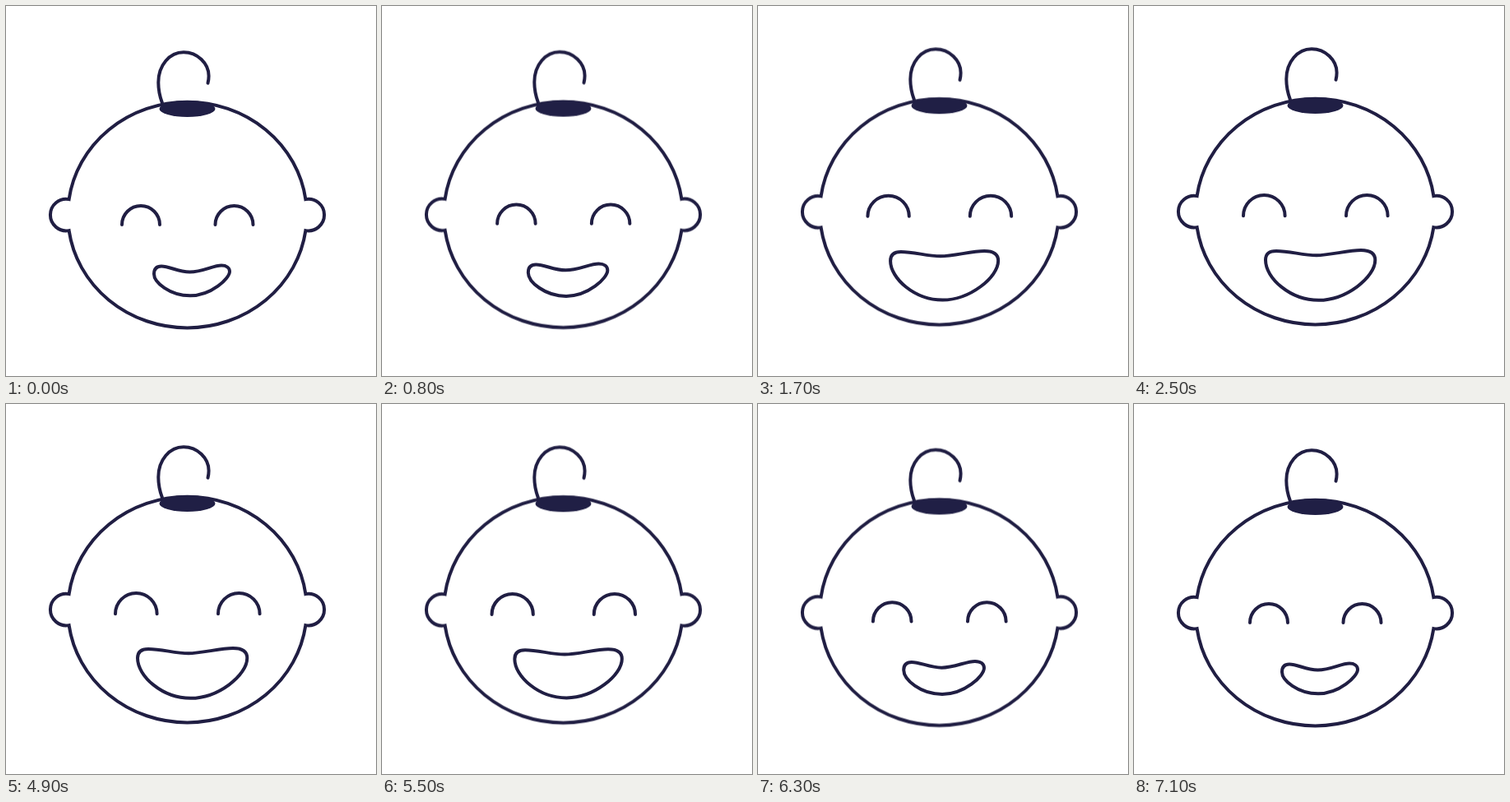
Animation, 450 px wide and 450 px high, one loop 7200 ms. Source, as an HTML page:

```html
<!DOCTYPE html>
<html lang="en">
<head>
<meta charset="utf-8">
<title>Laughing baby</title>
<style>
  html, body { margin: 0; width: 100%; height: 100%; overflow: hidden; background: #fff; }
  svg { display: block; width: 100%; height: 100%; }
  path {
    fill: none;
    stroke: #201e43;
    stroke-width: 4;
    stroke-linecap: round;
  }
  ellipse { fill: #201f45; }

  .head, .eye, .mouth {
    animation: 7200ms cubic-bezier(.82, 0, .18, 1) infinite;
  }
  .head { animation-name: lift; }
  .left { animation-name: left-eye; }
  .right { animation-name: right-eye; }
  .mouth { animation-name: laugh; stroke-linejoin: round; }

  /* smile, open laugh, hold, back to smile */
  @keyframes lift {
    0%, 100% { transform: translateY(0); }
    32.2%, 66.667% { transform: translateY(-4px); }
  }
  @keyframes left-eye {
    0%, 100% { d: path("M141 266A23 23 0 0 1 187 266"); }
    32.2%, 66.667% { d: path("M133 255.3A25.3 25.3 0 0 1 183.6 255.3"); }
  }
  @keyframes right-eye {
    0%, 100% { d: path("M254.5 266A23 23 0 0 1 300.5 266"); }
    32.2%, 66.667% { d: path("M258 255.3A25.3 25.3 0 0 1 308.6 255.3"); }
  }
  @keyframes laugh {
    0%, 100% {
      d: path("M180 326C180 320 183 316.5 189 316.5C199 316.5 209 323.5 223.5 323.5C239 323.5 252 315.5 262 315.5C268 315.5 272 318.5 272 323C272 331 250 352.3 224 352.3C199 352.3 180 336 180 326Z");
    }
    32.2%, 66.667% {
      d: path("M160 309C160 301.5 164 298 173 298C190 298 205 303.2 222 303.2C238 303.2 260 297 276 297C288 297 293.3 301.5 293.3 309C293.3 330 258 357.8 224.5 357.8C190 357.8 160 331 160 309Z");
    }
  }
</style>
</head>
<body>
<svg viewBox="0 0 450 450">
  <g class="head">
    <!-- skull with both ears as one outline -->
    <path d="M76.6 235.1A145.3 137.3 0 0 1 364.4 235.1A19.3 19.3 0 1 1 364.4 273.1A145.3 137.3 0 0 1 76.6 273.1A19.3 19.3 0 1 1 76.6 235.1Z"/>
    <ellipse cx="220.5" cy="125" rx="34" ry="10"/>
    <path d="M190 118C187 110 185.3 103 185.3 93C185.3 72 199 56.3 216 56.3C233 56.3 246.6 70 246.6 85C246.6 88 246.3 90.5 245.5 93.7"/>
  </g>
  <path class="eye left" d="M141 266A23 23 0 0 1 187 266"/>
  <path class="eye right" d="M254.5 266A23 23 0 0 1 300.5 266"/>
  <path class="mouth" d="M180 326C180 320 183 316.5 189 316.5C199 316.5 209 323.5 223.5 323.5C239 323.5 252 315.5 262 315.5C268 315.5 272 318.5 272 323C272 331 250 352.3 224 352.3C199 352.3 180 336 180 326Z"/>
</svg>
</body>
</html>
```
